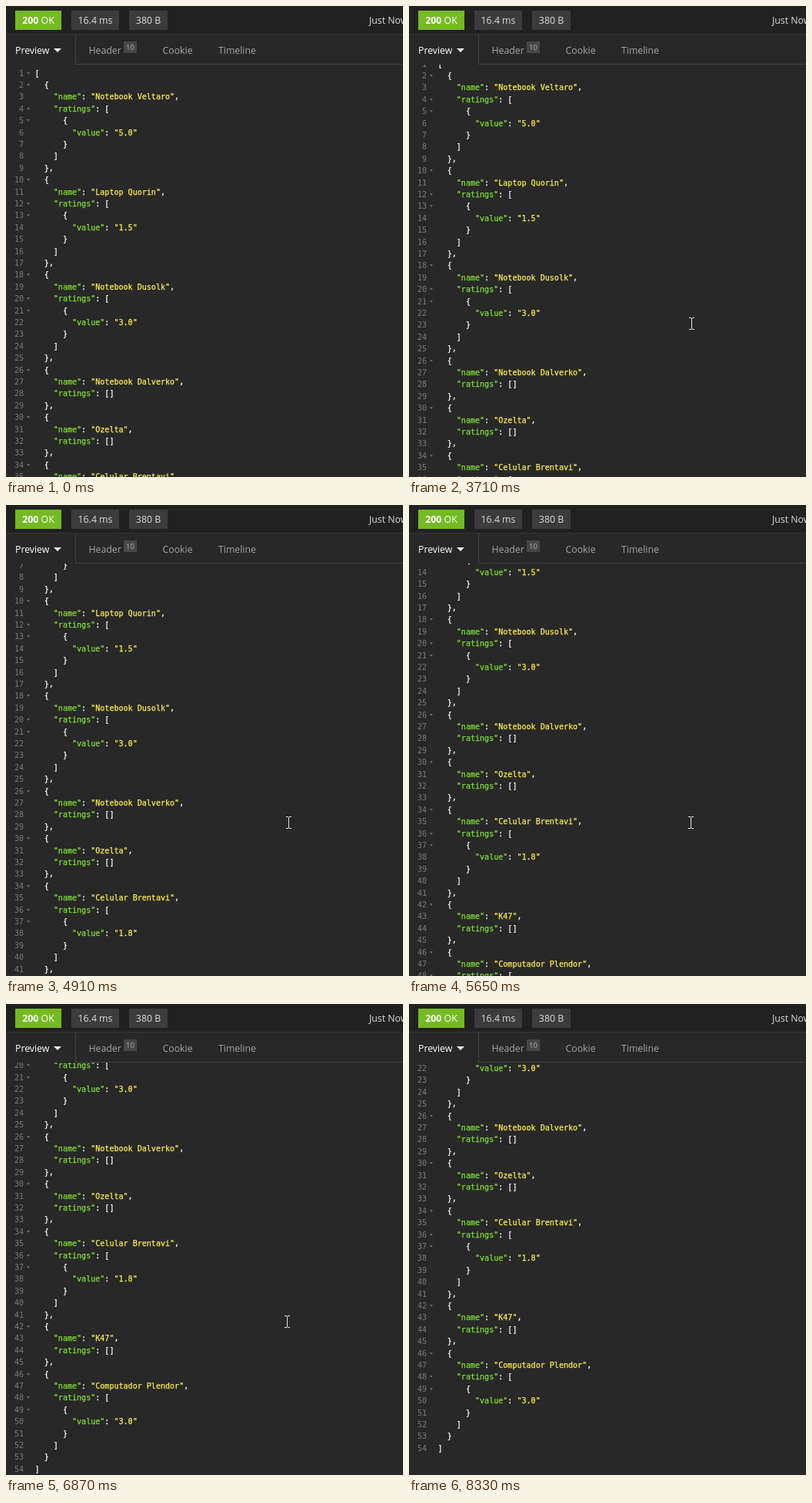
Recreate the animation shown at these times as an HTML page. Size 516x611 px, loop 9200 ms.

```html
<!DOCTYPE html>
<html lang="en">
<head>
<meta charset="utf-8">
<title>Response preview</title>
<style>
  html, body { margin: 0; width: 100%; height: 100%; overflow: hidden; background: #282828; }
  #stage { position: relative; width: 516px; height: 611px; overflow: hidden; background: #282828;
    font: 12.3px/25px "Open Sans", "Noto Sans", sans-serif; color: #eee; }
  #stage div, #stage span, #stage svg { position: absolute; white-space: pre; }
  #stage span span { position: static; }
  #bar { left: 0; top: 0; width: 516px; height: 36px; background: #212121; border-bottom: 1px solid #363636; }
  .tag { top: 6px; height: 25px; background: #3c3c3c; text-align: center; color: #ddd; }
  .ok { background: #75ba24; color: #fff; }
  .tab { top: 45px; color: #a4a4a4; }
  #edge { left: 90px; top: 37px; width: 430px; height: 38px; border: solid #424242; border-width: 0 0 1px 1px; }
  #badge { left: 153px; top: 46px; width: 17px; height: 15px; background: #474747; color: #b0b0b0;
    font-size: 9.5px; line-height: 15px; text-align: center; }
  .tri { width: 0; height: 0; border: solid transparent; border-bottom-width: 0; }
  #drop { left: 62px; top: 55px; border-width: 5px 5px 0; border-top-color: #eee; }
  #view { left: 0; top: 76px; width: 516px; height: 535px; overflow: hidden; }
  #code { left: 0; top: 0; width: 516px; font: 10.05px/15px "DejaVu Sans Mono", "Noto Sans Mono", monospace; }
  .row { left: 0; width: 516px; height: 15px; color: #fff; }
  .num { right: 493px; color: #7a7a7a; }
  .fold { left: 27px; top: 6px; border-width: 3px 2.5px 0; border-top-color: #686868; }
  .text { left: 37.6px; -webkit-text-stroke: 0.25px; }
  .key { color: #7fe030; }
  .str { color: #fff04a; }
  #beam { left: 0; top: 0; width: 7px; height: 16px; }
</style>
</head>
<body>
<div id="stage">
  <div id="bar">
    <div class="tag ok" style="left:12px;width:60px"><b>200</b> OK</div>
    <div class="tag" style="left:85px;width:62px">16.4 ms</div>
    <div class="tag" style="left:160px;width:50px">380 B</div>
    <div style="left:472px;top:6px;color:#ddd">Just Now</div>
  </div>
  <div id="edge"></div>
  <div class="tab" style="left:12px;color:#fff">Preview</div>
  <div id="drop" class="tri"></div>
  <div class="tab" style="left:107.5px">Header</div>
  <div id="badge">10</div>
  <div class="tab" style="left:203.5px">Cookie</div>
  <div class="tab" style="left:276px">Timeline</div>
  <div id="view"><div id="code"></div></div>
  <svg id="beam" viewBox="0 0 7 16" shape-rendering="crispEdges">
    <path d="M0 0h3v1h1V0h3v1H4v14h3v1H4v-1H3v1H0v-1h3V1H0z" fill="#e6e6e6"/>
  </svg>
</div>
<script>
const LOOP = 9200, LINE = 15.4;
const code = document.getElementById("code");
const beam = document.getElementById("beam");

const products = [
  ["Notebook Veltaro", "5.0"], ["Laptop Quorin", "1.5"], ["Notebook Dusolk", "3.0"],
  ["Notebook Dalverko"], ["Ozelta"], ["Celular Brentavi", "1.8"],
  ["K47"], ["Computador Plendor", "3.0"]
].map(([name, value]) => ({ name, ratings: value ? [{ value }] : [] }));

function add(parent, tag, cls, text = "") {
  const el = document.createElement(tag);
  el.className = cls;
  el.textContent = text;
  return parent.appendChild(el);
}

JSON.stringify(products, null, 2).split("\n").forEach((line, i) => {
  const row = add(code, "div", "row");
  row.style.top = Math.round(3.6 + i * LINE) + "px";
  add(row, "span", "num", i + 1);
  if (/[[{]$/.test(line)) add(row, "div", "fold tri");
  const text = add(row, "span", "text");
  for (const part of line.match(/"[^"]*"(?=:)|"[^"]*"|[^"]+/g)) {
    const isKey = /^"(name|ratings|value)"$/.test(part);
    add(text, "span", isKey ? "key" : part[0] === '"' ? "str" : "", part);
  }
});

const clamp = p => Math.min(1, Math.max(0, p));
const smooth = p => p * p * (3 - 2 * p);
const mix = (a, b, p) => Math.round(a + (b - a) * p);
// Motion is shown in held steps counted from the first one.
const stepAt = (t, first, hold) => Math.floor((t - first) / hold);

// Wheel turns: first visible step, distance, time already eased by then
const WHEEL_MS = 200;
const turns = [
  { first: 3710, by: 100, lead: 43 },
  { first: 4910, by: 100, lead: 13 },
  { first: 5780, by: 100, lead: 43 },
  { first: 7330, by: 27, lead: 43 }
];

function scrollAt(t) {
  return turns.reduce((sum, { first, by, lead }) => {
    const n = stepAt(t, first, 70);
    return n < 0 ? sum : sum + by * smooth(clamp((lead + n * 70) / WHEEL_MS));
  }, 0);
}

// The resting pointer slips one pixel left at each of these times.
const ENTER = 660, LEAVE = 8060, MOVE_HOLD = 67.5;
const slips = [2250, 5650, 6870, 7200, 7730];

function pointerAt(t) {
  if (t < ENTER) return null;
  if (t >= LEAVE) {
    const n = stepAt(t, LEAVE, MOVE_HOLD), p = (n / 3) ** 2;
    return n > 3 ? null : [mix(358, 468, p), mix(406, 581, p)];
  }
  const p = 1 - (1 - clamp(stepAt(t, ENTER, MOVE_HOLD) / 7)) ** 2;
  const slipped = slips.filter(s => s <= t).length;
  return [mix(484, 365, p) - slipped, mix(592, 405, p) - Math.min(1, slipped)];
}

const start = performance.now();
function draw() {
  const t = Math.max(0, performance.now() - start) % LOOP;
  code.style.transform = `translateY(${-Math.round(scrollAt(t))}px)`;
  const spot = pointerAt(t);
  beam.style.visibility = spot ? "visible" : "hidden";
  if (spot) beam.style.transform = `translate(${spot[0]}px, ${spot[1]}px)`;
  requestAnimationFrame(draw);
}
draw();
</script>
</body>
</html>
```
